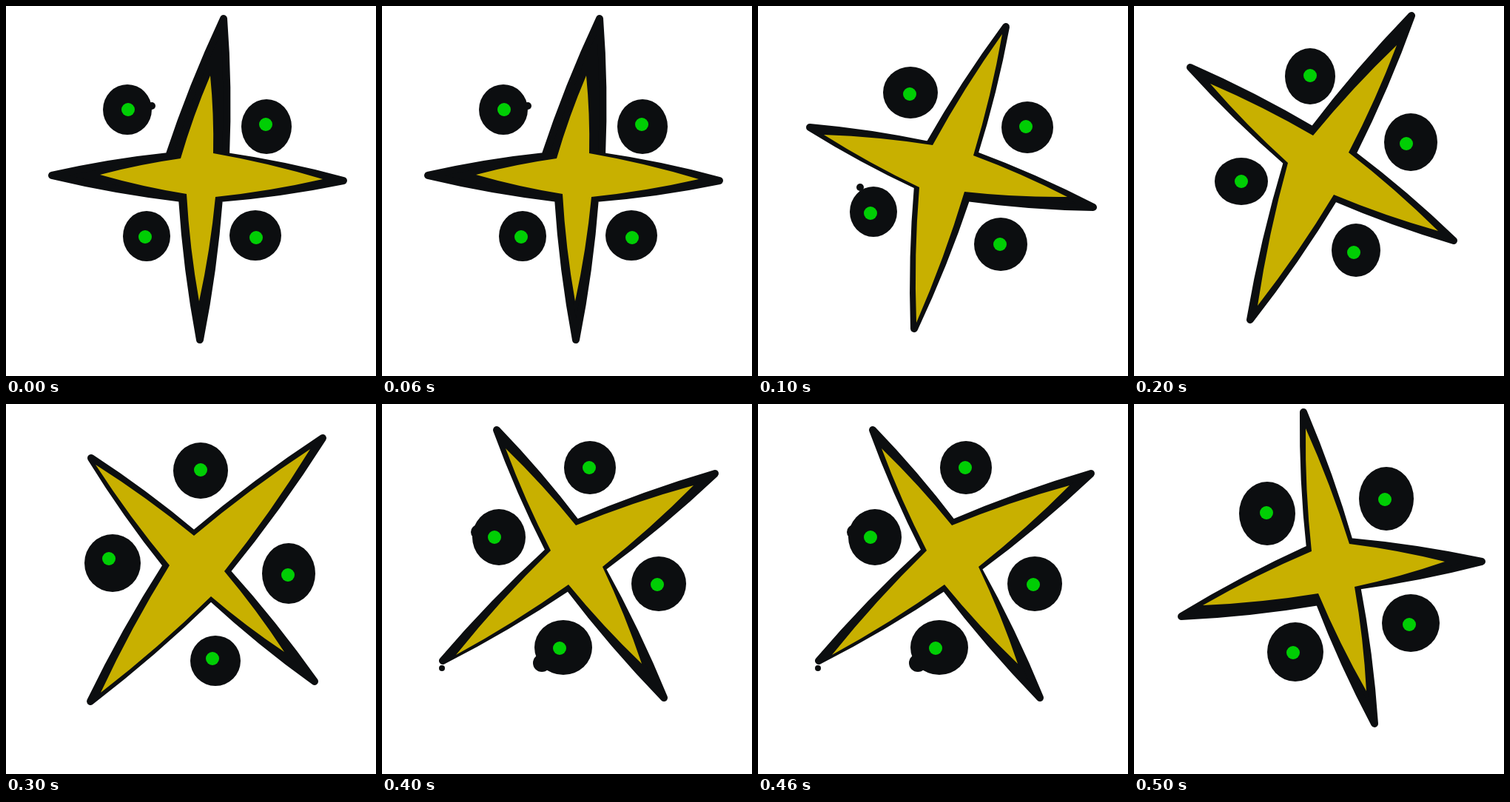
Write an HTML page that moves like this. It is 500x500 px and loops after 600 ms.

```html
<!DOCTYPE html>
<html lang="en">
<head>
<meta charset="utf-8">
<title>Spinning star</title>
<style>
  html, body { margin: 0; width: 100%; height: 100%; overflow: hidden; background: #fff; }
  svg { display: block; width: 100vw; height: 100vh; }
  .ink { fill: #0c0e10; }
  .star { stroke: #0c0e10; stroke-width: 10; stroke-linejoin: round; }
  .gold { fill: #c8b000; }
  .eye { fill: #00ce04; }
</style>
</head>
<body>
<svg id="stage" viewBox="0 0 500 500"></svg>
<script>
const STEP = 100;   // ms per pose
const BOW = 0.03;   // how far star edges swell outward, per unit length
const EYE = 9;
const stage = document.getElementById('stage');
const poses = [];

function add(parent, tag, attrs) {
  const el = document.createElementNS('http://www.w3.org/2000/svg', tag);
  for (const k in attrs) el.setAttribute(k, attrs[k]);
  parent.appendChild(el);
  return el;
}

// Four tips and four inner corners, clockwise, joined by slightly bowed edges.
function star(pts) {
  const edges = pts.map(([x, y], i) => {
    const [u, v] = pts[(i + 1) % pts.length];
    const cx = (x + u) / 2 + (v - y) * BOW;
    const cy = (y + v) / 2 - (u - x) * BOW;
    return `Q${cx} ${cy} ${u} ${v}`;
  });
  return `M${pts[0]}${edges.join('')}Z`;
}

// orbs: [x, y, rx, ry, eyeX, eyeY]; blots: [x, y, r]
function pose({ outline, fill, orbs, blots = [] }) {
  const g = add(stage, 'g', { visibility: 'hidden' });
  const oval = (cls, cx, cy, rx, ry = rx) => add(g, 'ellipse', { class: cls, cx, cy, rx, ry });
  add(g, 'path', { class: 'ink star', d: star(outline) });
  add(g, 'path', { class: 'gold', d: star(fill) });
  for (const [x, y, r] of blots) oval('ink', x, y, r);
  for (const [x, y, rx, ry, ex, ey] of orbs) {
    oval('ink', x, y, rx, ry);
    oval('eye', ex, ey, EYE);
  }
  poses.push(g);
}

pose({
  outline: [[294, 17], [297, 203], [456, 236], [288, 260], [262, 451], [238, 260], [62, 229], [220, 203]],
  fill: [[276, 94], [280, 199], [428, 234], [283, 258], [261, 399], [244, 254], [127, 228], [236, 206]],
  orbs: [[164, 140, 33, 34, 165, 140], [352, 163, 34, 37, 351, 160],
         [190, 311, 32, 34, 188, 312], [337, 310, 35, 34, 338, 313]],
  blots: [[197, 135, 5]]
});

pose({
  outline: [[335, 28], [292, 201], [453, 272], [282, 259], [211, 436], [216, 243], [70, 164], [231, 188]],
  fill: [[330, 38], [291, 202], [418, 258], [279, 251], [214, 428], [218, 245], [89, 174], [236, 188]],
  orbs: [[206, 117, 37, 35, 205, 119], [364, 164, 35, 35, 362, 163],
         [156, 278, 32, 34, 152, 280], [328, 322, 36, 36, 327, 322]],
  blots: [[138, 245, 5]]
});

pose({
  outline: [[375, 13], [295, 200], [432, 317], [271, 259], [157, 424], [207, 211], [76, 83], [242, 168]],
  fill: [[355, 53], [290, 198], [411, 304], [270, 255], [167, 405], [208, 212], [103, 105], [242, 175]],
  orbs: [[238, 95, 34, 38, 238, 94], [374, 184, 36, 39, 368, 186],
         [145, 237, 36, 32, 145, 237], [300, 330, 33, 36, 297, 333]]
});

pose({
  outline: [[428, 46], [298, 226], [417, 375], [277, 261], [114, 402], [217, 218], [115, 73], [254, 176]],
  fill: [[411, 61], [295, 226], [376, 335], [277, 260], [128, 390], [221, 218], [121, 82], [254, 178]],
  orbs: [[263, 90, 37, 38, 263, 89], [382, 229, 36, 41, 381, 231],
         [144, 215, 38, 39, 139, 209], [283, 347, 34, 34, 279, 344]]
});

pose({
  outline: [[450, 94], [297, 222], [381, 397], [252, 247], [82, 347], [226, 198], [155, 35], [263, 161]],
  fill: [[421, 110], [298, 220], [351, 351], [252, 244], [100, 339], [228, 198], [167, 60], [262, 164]],
  orbs: [[281, 86, 35, 36, 280, 86], [374, 243, 37, 37, 372, 244],
         [158, 180, 36, 38, 152, 180], [245, 329, 39, 37, 240, 330]],
  blots: [[81, 357, 4], [130, 173, 10], [216, 350, 12]]
});

pose({
  outline: [[229, 11], [291, 186], [470, 213], [301, 246], [325, 432], [250, 267], [64, 287], [238, 195]],
  fill: [[232, 33], [291, 189], [420, 213], [298, 247], [314, 388], [249, 256], [93, 272], [240, 199]],
  orbs: [[180, 148, 38, 43, 179, 147], [341, 128, 37, 43, 339, 129],
         [218, 335, 38, 40, 215, 336], [374, 296, 39, 39, 372, 298]]
});

const start = performance.now();
let shown = poses[0];

function draw(now) {
  shown.setAttribute('visibility', 'hidden');
  shown = poses[Math.floor(Math.max(0, now - start) / STEP) % poses.length];
  shown.setAttribute('visibility', 'visible');
  requestAnimationFrame(draw);
}
draw(start);
</script>
</body>
</html>
```
